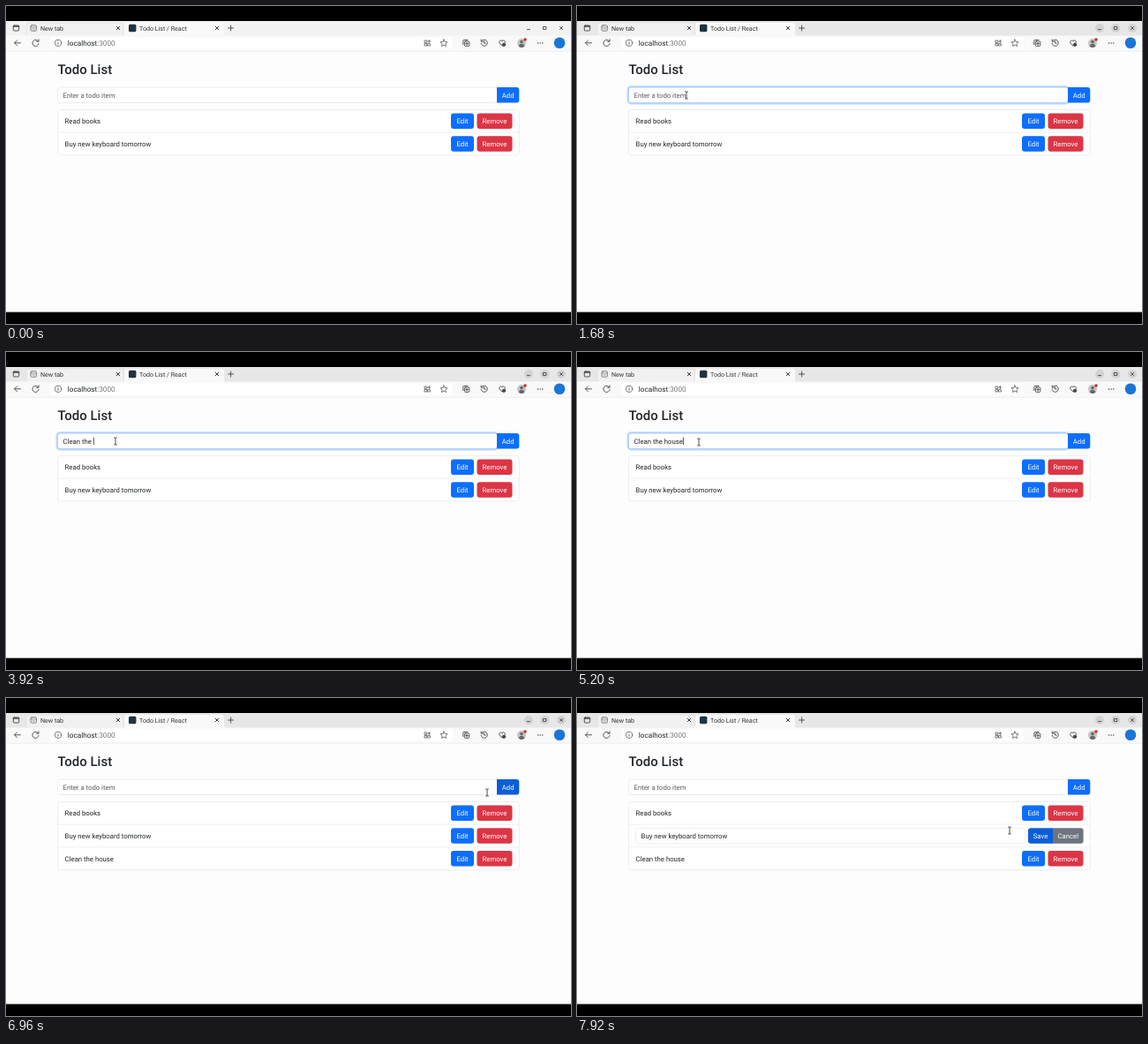
An HTML page for the animation above (8 s loop, 640 px wide and 360 px high).

```html
<!DOCTYPE html>
<html lang="en">
<head>
<meta charset="utf-8">
<title>Todo List</title>
<style>
html, body { margin: 0; height: 100%; overflow: hidden; background: #000; }
svg { display: block; width: 100vw; height: 100vh; }
text { font: 7.75px Roboto, "Noto Sans", sans-serif; fill: #212529; text-rendering: geometricPrecision; white-space: pre; }
.tab { font-size: 7.1px; fill: #333; }
.url { font-size: 8.2px; }
.mid { text-anchor: middle; fill: #fff; }
.icon { fill: none; stroke: #444; stroke-width: .9; stroke-linecap: round; stroke-linejoin: round; }
.field { fill: #fff; stroke: #dee2e6; stroke-width: .6; }
</style>
</head>
<body>
<svg viewBox="0 0 640 360">
  <rect y="17" width="640" height="329.5" fill="#fdfdfd"/>

  <!-- tab strip -->
  <rect id="strip" y="17" width="640" height="17"/>
  <path d="M23 33.5V22q0-3 3-3H130q3 0 3 3V33.5" fill="#f1f1f1" stroke="#d6d6d6" stroke-width=".5"/>
  <path d="M131 34q3 0 3-3V22q0-3 3-3H244q3 0 3 3V31q0 3 3 3z" fill="#f9f9f9"/>
  <g class="icon">
    <rect x="8.3" y="22" width="6.4" height="6" rx="1"/>
    <path d="M8.5 23h6" stroke-width="1.6"/>
    <rect x="28" y="21.8" width="6.4" height="6.4" rx="1.2" stroke="#777"/>
    <path d="M28 24h6.4M30 26h2.5" stroke="#777" stroke-width=".7"/>
    <path d="M125.2 23.2l3.6 3.6m0-3.6l-3.6 3.6M237.2 23.2l3.6 3.6m0-3.6l-3.6 3.6" stroke="#222"/>
    <path d="M251.6 25h6M254.6 22v6"/>
  </g>
  <rect x="139" y="20.8" width="8.4" height="8.4" rx="1.5" fill="#20323f"/>
  <text class="tab" x="39" y="27.5">New tab</text>
  <text class="tab" x="151" y="27.5">Todo List / React</text>
  <g id="discs" fill="#d2d2d2">
    <circle cx="592" cy="25" r="5"/><circle cx="610.3" cy="25" r="5"/><circle cx="629" cy="25" r="5"/>
  </g>
  <g class="icon" stroke-width=".8">
    <path d="M590.4 26.6h3.2M627.4 23.4l3.2 3.2m0-3.2l-3.2 3.2"/>
    <rect x="608.8" y="23.5" width="3" height="3"/>
  </g>

  <!-- toolbar -->
  <rect y="33.5" width="640" height="17.8" fill="#f9f9f9"/>
  <path d="M0 51.3h640" stroke="#e6e6e6" stroke-width=".6"/>
  <rect x="50" y="35.3" width="456" height="13.4" rx="3" fill="#fff"/>
  <g class="icon">
    <path d="M16.5 41.8H9.5l3-3m-3 3l3 3"/>
    <path d="M36.6 40a3.6 3.6 0 1 0 .5 2.5M37 37.8v2.4h-2.4"/>
    <circle cx="59" cy="41.8" r="3.7" stroke-width=".7"/>
    <path d="M59 41.4v2M59 39.8v.1" stroke-width=".8"/>
    <path d="M474.4 39h2.4v2.4h-2.4zM474.4 42.6h2.4V45h-2.4zM478 42.6h2.4V45H478zM479.3 38.5v3M477.8 40h3" stroke-width=".7"/>
    <path d="M496 37.9l1.2 2.6 2.8.3-2.1 1.9.6 2.8-2.5-1.4-2.5 1.4.6-2.8-2.1-1.9 2.8-.3z" stroke-width=".7"/>
    <rect x="519.4" y="40" width="5.4" height="5.4" rx="1"/>
    <path d="M517.8 43.6v-4q0-1.2 1.2-1.2h4M522.1 41.3v2.8M520.7 42.7h2.8"/>
    <path d="M538.7 39.7a3.6 3.6 0 1 1-.6 2.5M538.2 38v2.2h2.2M541.6 39.9v2.2h1.7"/>
    <path d="M562 45l-2.8-2.8a1.9 1.9 0 0 1 2.8-2.6 1.9 1.9 0 0 1 3 2.4"/>
    <circle cx="564" cy="43.8" r="1.7" fill="#444"/>
  </g>
  <circle cx="584" cy="42" r="5" fill="#c4c4c4"/>
  <circle cx="584" cy="40.6" r="1.8" fill="#666"/>
  <path d="M580.6 45.5a3.5 3.5 0 0 1 6.8 0 5 5 0 0 1-6.8 0z" fill="#666"/>
  <circle cx="588" cy="38" r="1.7" fill="#d3202b"/>
  <path d="M602.6 42h.01M605.2 42h.01M607.8 42h.01" stroke="#333" stroke-width="1.3" stroke-linecap="round"/>
  <circle cx="627" cy="41.8" r="6.3" fill="#1b74d8"/>
  <text class="url" x="69.8" y="44.7">localhost<tspan fill="#777">:3000</tspan></text>

  <!-- page -->
  <text x="58.6" y="77.2" style="font-size:15px;font-weight:500">Todo List</text>
  <rect id="ring" x="57.6" y="91.2" width="499.4" height="19.2" rx="3.5" fill="none" stroke="#0d6efd" stroke-opacity=".27" stroke-width="2"/>
  <rect id="entry" class="field" x="58.5" y="92.1" width="498" height="17.4" rx="2.8"/>
  <text id="hint" x="64.5" y="103.6" style="fill:#595c5f">Enter a todo item</text>
  <text id="typed" x="64.5" y="103.6"></text>
  <rect id="caret" y="96.5" width=".7" height="8.6" fill="#111"/>
  <rect id="list" class="field" x="58.5" y="117.6" width="522.7" rx="3"/>
  <g id="rows"></g>

  <!-- pointers, hot spot at 0,0 -->
  <g id="pointer">
    <path id="beam" d="M-1.8-4.2q1.8 0 1.8 1V3.2q0 1 1.8 1M1.8-4.2Q0-4.2 0-3.2M-1.8 4.2Q0 4.2 0 3.2" fill="none" stroke="#222" stroke-width=".8"/>
    <path id="arrow" d="M0 0V9.3L2.2 7.4 3.6 10.6 5.1 9.9 3.7 6.8H6.6z" fill="#111" stroke="#fff" stroke-width=".6"/>
    <path id="hand" d="M-.9.1Q0-.9.9.1V3L4 3.8Q5 4.1 4.8 5.2L4.2 8.3H-.8L-3.2 5Q-3.3 3.8-2 4.2L-.9 5.2z" fill="#222" stroke="#fff" stroke-width=".6"/>
  </g>
</svg>
<script>
const LOOP = 8000, STEP = 80;
const FOCUS = 1680, CARET_OFF = 5400, ADDED = 6640, EDITING = 7600;
const BLUE = ['#0d6efd', '#0b5ed7'], RED = ['#dc3545', '#bb2d3b'], GRAY = ['#6c757d', '#5c636a'];
const PHRASE = 'Clean the house';
const KEYS = [2320, 2480, 2720, 2800, 2960, 3280, 3440, 3680, 3760, 3920, 4160, 4320, 4560, 4640, 4800];
const PATH = [
  [1680, 124, 101], [5120, 124, 101], [5200, 138, 102], [5280, 212, 118], [5360, 212, 118],
  [5440, 300, 140], [5600, 460, 153], [5760, 590, 140], [5920, 632, 118], [6080, 590, 106],
  [6240, 567, 101], [6400, 567, 100], [6800, 566, 101], [6880, 560, 102], [6960, 545, 107],
  [7120, 533, 107], [7280, 522, 140], [7440, 517, 155], [7680, 517, 156], [7840, 513, 155], [7920, 490, 150]
];

const $ = id => document.getElementById(id);
const buttons = [];

function make(parent, tag, attrs, content = '') {
  const el = document.createElementNS('http://www.w3.org/2000/svg', tag);
  for (const k in attrs) el.setAttribute(k, attrs[k]);
  el.textContent = content;
  return parent.appendChild(el);
}

function show(el, on) { el.style.display = on ? '' : 'none'; }

// l and r are the corner radii on the left and right side
function button(parent, x, cy, w, label, colors, l = 3, r = 3) {
  const y = cy - 8.8, h = 17.6;
  const d = `M${x + l} ${y}h${w - l - r}q${r} 0 ${r} ${r}v${h - 2 * r}q0 ${r} ${-r} ${r}` +
    `h${l + r - w}q${-l} 0 ${-l} ${-l}v${2 * l - h}q0 ${-l} ${l} ${-l}z`;
  const shape = make(parent, 'path', { d });
  make(parent, 'text', { class: 'mid', x: x + w / 2, y: cy + 2.8 }, label);
  buttons.push({ parent, shape, x, y, w, h, colors });
}

function row(i, label) {
  const g = make($('rows'), 'g', {}), cy = 130.3 + i * 25.75;
  if (i) make(g, 'path', { d: `M58.5 ${cy - 12.9}h522.7`, stroke: '#dee2e6', 'stroke-width': .6 });
  const view = make(g, 'g', {});
  make(view, 'text', { x: 66.6, y: cy + 2.8 }, label);
  button(view, 504, cy, 26, 'Edit', BLUE);
  button(view, 533.5, cy, 40, 'Remove', RED);
  return { g, view, cy };
}

button($('rows'), 556, 100.8, 25.3, 'Add', BLUE, 0, 3);
row(0, 'Read books');
const second = row(1, 'Buy new keyboard tomorrow');
const third = row(2, PHRASE);

const editor = make(second.g, 'g', {});
make(editor, 'rect', { class: 'field', x: 66.8, y: second.cy - 8.8, width: 440.5, height: 17.6, rx: 2.8 });
make(editor, 'text', { x: 72.6, y: second.cy + 2.8 }, 'Buy new keyboard tomorrow');
button(editor, 511, second.cy, 28, 'Save', BLUE, 3, 0);
button(editor, 539, second.cy, 34.6, 'Cancel', GRAY, 0, 3);

function position(t) {
  const i = PATH.findIndex(p => p[0] > t);
  if (i < 0) return PATH[PATH.length - 1].slice(1);
  if (!i) return [-50, -50];
  const [a, x, y] = PATH[i - 1], [b, u, v] = PATH[i], k = (t - a) / (b - a);
  return [x + (u - x) * k, y + (v - y) * k];
}

function inside([px, py], { x, y, w, h }) {
  return px >= x && px <= x + w && py >= y && py <= y + h;
}

function draw(t) {
  const focused = t >= FOCUS && t < ADDED, added = t >= ADDED, editing = t >= EDITING;
  const text = added ? '' : PHRASE.slice(0, KEYS.filter(k => k <= t).length);

  $('strip').setAttribute('fill', t < FOCUS ? '#f2f2f2' : '#e7e7e7');
  show($('discs'), t >= FOCUS);
  show($('ring'), focused);
  $('entry').style.stroke = focused ? '#86b7fe' : '';
  show($('hint'), !text);
  $('typed').textContent = text;
  show($('caret'), text && t < CARET_OFF);
  $('caret').setAttribute('x', 64.6 + $('typed').getComputedTextLength());

  $('list').setAttribute('height', added ? 77 : 51.2);
  show(third.g, added);
  show(second.view, !editing);
  show(editor, editing);

  // button colours fade a step behind the pointer
  const pos = position(t), late = position(t - STEP);
  const live = buttons.filter(b => b.parent.style.display !== 'none' && (added || b.parent !== third.view));
  for (const b of live) b.shape.setAttribute('fill', b.colors[+inside(late, b)]);

  const fields = [{ x: 58, y: 92, w: 498, h: 18 }];
  if (editing) fields.push({ x: 67, y: 147, w: 440, h: 18 });
  const hand = live.some(b => inside(pos, b));
  const beam = !hand && fields.some(f => inside(pos, f));
  show($('hand'), hand);
  show($('beam'), beam);
  show($('arrow'), !hand && !beam);
  $('pointer').setAttribute('transform', `translate(${pos})`);
}

const start = performance.now();
function tick(now) {
  const t = Math.max(0, now - start) % LOOP;
  draw(Math.floor(t / STEP) * STEP);
  requestAnimationFrame(tick);
}
draw(0);
requestAnimationFrame(tick);
</script>
</body>
</html>
```
